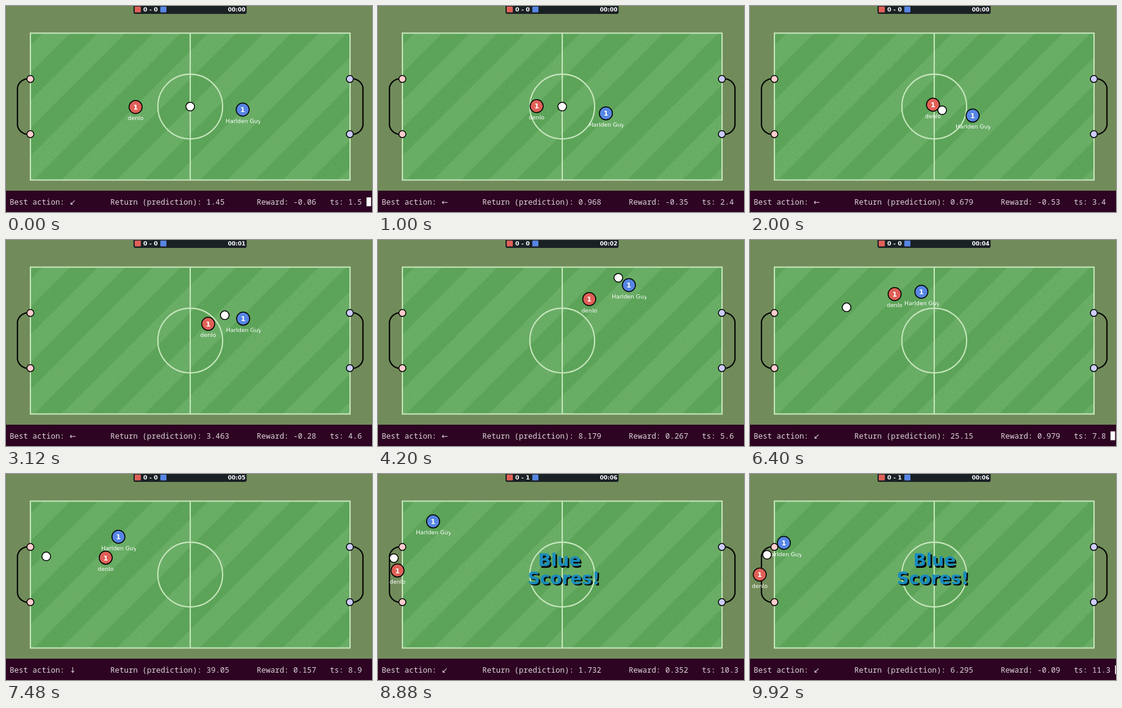
Recreate the animation shown at these times as an HTML page. Size 600 by 338 pixels, loop 9960 ms.

```html
<!DOCTYPE html>
<html lang="en">
<head>
<meta charset="utf-8">
<title>Pitch</title>
<style>
html, body { margin: 0; width: 100%; height: 100%; overflow: hidden; background: #718c5a; }
svg { display: block; width: 100vw; height: 100vh; }
text { font-family: "DejaVu Sans", sans-serif; fill: #fff; }
.bold { font-weight: bold; }
.mid { text-anchor: middle; }
.name { font-size: 9.3px; }
.num { font-size: 11.3px; font-weight: bold; text-anchor: middle; }
.term text { font: 12.5px "Noto Sans Mono", "DejaVu Sans Mono", monospace; fill: #ddd3da; }
.term .arrow { font: 12.5px "DejaVu Sans", sans-serif; }
.goal text { font-size: 28px; font-weight: bold; text-anchor: middle; }
.goal .shade { fill: #000; }
.goal .face { fill: #148ac6; }
.disc { stroke: #000; stroke-width: 1.5; }
</style>
</head>
<body>
<svg viewBox="0 0 600 338">
  <defs>
    <pattern id="grass" width="90.6" height="90.6" patternUnits="userSpaceOnUse" patternTransform="translate(302 165)">
      <rect width="91" height="91" fill="#5fa55c"/>
      <path d="M0 0H45.3L0 45.3ZM90.6 0V45.3L45.3 90.6H0Z" fill="#6daf69"/>
    </pattern>
    <filter id="grain" x="0" y="0" width="1" height="1">
      <feTurbulence type="fractalNoise" baseFrequency="0.6" numOctaves="2" seed="4"/>
      <feColorMatrix values="0 0 0 0 0  0 0 0 0 .2  0 0 0 0 0  .3 0 0 0 -.12"/>
    </filter>
    <clipPath id="nameBox"><rect x="-28.3" y="10" width="57" height="16"/></clipPath>
  </defs>
  <rect width="600" height="338" fill="#718c5a"/>
  <rect x="40" y="44.5" width="524" height="241" fill="url(#grass)"/>
  <rect x="40" y="44.5" width="524" height="241" filter="url(#grain)"/>
  <g fill="none" stroke="#c7e6bd" stroke-width="2.1">
    <rect x="40" y="44.5" width="524" height="241"/>
    <path d="M302 44.5V285.5"/>
    <circle cx="302" cy="165" r="53.1"/>
  </g>
  <g fill="none" stroke="#000" stroke-width="2.1">
    <path d="M40 119.7A18 18 0 0 0 18.8 134V196A18 18 0 0 0 40 210.3"/>
    <path d="M564 119.7A18 18 0 0 1 585.2 134V196A18 18 0 0 1 564 210.3"/>
  </g>
  <g class="disc" fill="#ffcccc"><circle cx="40" cy="119.7" r="5.7"/><circle cx="40" cy="210.3" r="5.7"/></g>
  <g class="disc" fill="#ccccff"><circle cx="563.7" cy="119.7" r="5.7"/><circle cx="563.7" cy="210.3" r="5.7"/></g>

  <g id="red">
    <circle class="disc" r="10.7" fill="#df6057"/>
    <text class="num" y="4.2">1</text>
    <text class="name mid" y="21.5">denlo</text>
  </g>
  <g id="blue">
    <circle class="disc" r="10.7" fill="#5786e3"/>
    <text class="num" y="4.2">1</text>
    <g clip-path="url(#nameBox)"><text class="name" x="-28" y="21.5">Harlden Guy</text></g>
  </g>
  <circle id="ball" class="disc" r="7.1" fill="#fff"/>

  <g class="goal" id="goal">
    <g id="line1"><text class="shade" x="303.5" y="153.8">Blue</text><text class="face" x="301" y="151.2">Blue</text></g>
    <g id="line2"><text class="shade" x="303.5" y="183.3">Scores!</text><text class="face" x="301" y="180.7">Scores!</text></g>
  </g>

  <path d="M209 0H394.5V10Q394.5 13 391.5 13H212Q209 13 209 10Z" fill="#1a2125"/>
  <rect x="211" y="1" width="10" height="9.5" rx="1" fill="#df6057"/>
  <rect x="253" y="1" width="10" height="9.5" rx="1" fill="#5786e3"/>
  <text id="score" class="bold mid" x="237" y="9" font-size="9.5"></text>
  <text id="clock" class="bold" x="392.5" y="9" font-size="9" text-anchor="end"></text>

  <g class="term">
    <rect y="303" width="600" height="35" fill="#2d0422"/>
    <text x="6" y="325.5">Best action:</text>
    <text id="act" class="arrow" x="104" y="325.5"></text>
    <text id="ret" x="171" y="325.5"></text>
    <text id="rew" x="411" y="325.5"></text>
    <text id="ts" x="531" y="325.5"></text>
    <rect id="cursor" y="314" width="7.5" height="14.5" fill="#fff"/>
  </g>
</svg>
<script>
const LOOP = 9960, STEP = 40, KICKOFF = 1700, GOAL = 8200, BANNER = 2500;
const $ = id => document.getElementById(id);

// Monotone cubic through rows of [time, value, ...]
function track(keys) {
  const slope = (i, c) => (keys[i + 1][c] - keys[i][c]) / (keys[i + 1][0] - keys[i][0]);
  function tangent(i, c) {
    if (i === 0) return slope(0, c);
    if (i === keys.length - 1) return slope(i - 1, c);
    const a = slope(i - 1, c), b = slope(i, c);
    return a * b > 0 ? 2 * a * b / (a + b) : 0;
  }
  return (t, c = 1) => {
    let i = 0;
    while (i < keys.length - 2 && t >= keys[i + 1][0]) i++;
    const h = keys[i + 1][0] - keys[i][0];
    const u = Math.min(1, (t - keys[i][0]) / h), v = 1 - u;
    return keys[i][c] * v * v * (1 + 2 * u) + keys[i + 1][c] * u * u * (3 - 2 * u)
      + h * u * v * (tangent(i, c) * v - tangent(i + 1, c) * u);
  };
}

const movers = {
  red: track([[0, 212.5, 165.7], [2000, 300, 162], [4200, 346.3, 97], [5280, 300, 50],
    [7480, 163.5, 137.3], [8880, 32, 158.3], [9920, 16, 165]]),
  blue: track([[0, 388, 170], [2000, 365, 179.8], [4200, 411.3, 74], [5280, 369.5, 66],
    [7480, 184.3, 103], [8880, 90.3, 77.8], [9920, 55.5, 113]]),
  ball: track([[0, 302, 165], [KICKOFF, 302, 165], [2000, 315, 171], [3000, 354, 130],
    [4200, 394, 62], [5280, 291, 73], [6000, 201, 98], [7480, 66, 135.2],
    [GOAL, 40, 137.5], [8880, 26, 138], [9920, 28, 132.5]])
};
const returns = track([[0, 1.45], [2000, 0.679], [4200, 8.179], [5280, 12.86], [7480, 39.05],
  [8160, 45.2], [8240, 1.214], [8880, 1.732], [9920, 6.295]]);
const rewards = track([[0, -0.06], [2000, -0.53], [4200, 0.267], [5280, 1.847],
  [7480, 0.157], [8880, 0.352], [9920, -0.09]]);
const actions = [[0, "↙"], [1000, "←"], [4800, "↙"], [6600, "↓"], [GOAL, "↙"]];

const short = v => String(+v.toFixed(3)).slice(0, 5);
const shift = (id, x, y) => $(id).setAttribute("transform", `translate(${x.toFixed(2)} ${y.toFixed(2)})`);

function banner(t) {
  const p = (t - GOAL) / BANNER, on = p > 0 && p < 1;
  const x = 2 * p - 1, d = on ? 180 * x ** 5 : 0;
  $("goal").setAttribute("opacity", on ? 1 - Math.abs(x) ** 3 : 0);
  shift("line1", d, 0);
  shift("line2", -d, 0);
}

function draw(time) {
  const n = Math.floor(time % LOOP / STEP), t = n * STEP;
  for (const id in movers) shift(id, movers[id](t, 1), movers[id](t, 2));
  banner(t);
  const sec = Math.max(0, Math.floor((Math.min(t, GOAL) - KICKOFF) / 1000));
  $("clock").textContent = "00:0" + sec;
  $("score").textContent = t >= GOAL ? "0 - 1" : "0 - 0";
  $("act").textContent = actions.filter(a => a[0] <= t).pop()[1];
  $("ret").textContent = "Return (prediction): " + short(returns(t));
  $("rew").textContent = "Reward: " + short(rewards(t));
  const ts = (1.451 + t * 0.000995).toFixed(1);
  $("ts").textContent = "ts: " + ts;
  $("cursor").setAttribute("x", 6 + 7.5 * (75 + ts.length));
  $("cursor").setAttribute("opacity", n % 8 ? 0 : 1);
}

const start = performance.now();
function tick() {
  draw(performance.now() - start);
  requestAnimationFrame(tick);
}
tick();
</script>
</body>
</html>
```
